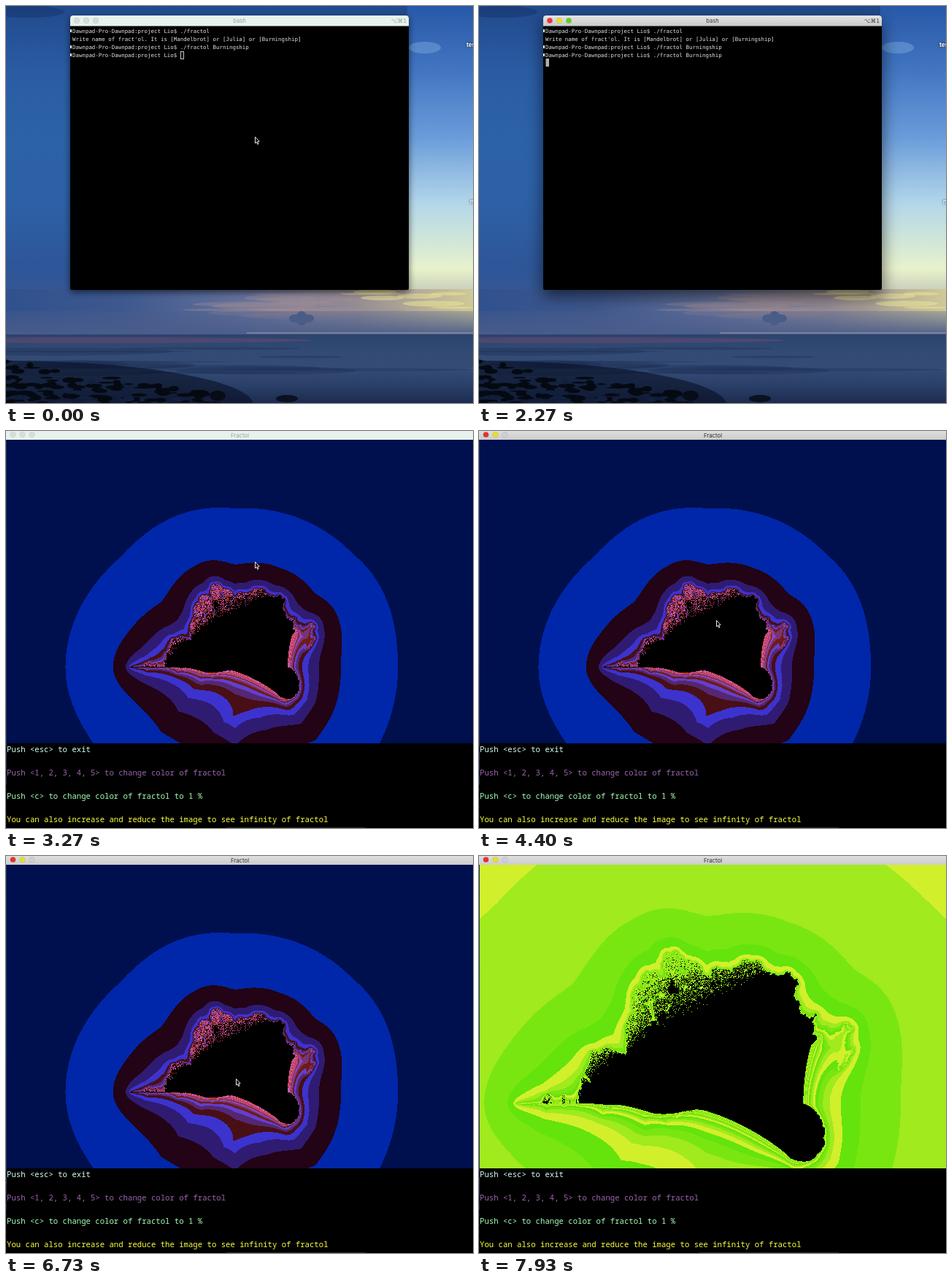
An HTML page with a canvas that plays this animation: 640x544 px, repeating every 8 s.

```html
<!DOCTYPE html>
<html lang="en">
<head>
<meta charset="utf-8">
<title>Fractol</title>
<style>
  html, body { margin: 0; width: 100%; height: 100%; overflow: hidden; background: #000; }
  canvas { display: block; }
</style>
</head>
<body>
<canvas id="stage" width="640" height="544"></canvas>
<script>
const LOOP = 8000;
const ctx = document.getElementById('stage').getContext('2d');
const MONO = '"DejaVu Sans Mono", monospace';
const SANS = 'Inter, sans-serif';

// ---------- helpers ----------
function rect(x, y, w, h, fill) {
  ctx.fillStyle = fill;
  ctx.fillRect(x, y, w, h);
}
function roundRect(x, y, w, h, radii, fill) {
  ctx.fillStyle = fill;
  ctx.beginPath();
  ctx.roundRect(x, y, w, h, radii);
  ctx.fill();
}
function ellipse(x, y, rx, ry, fill) {
  ctx.fillStyle = fill;
  ctx.beginPath();
  ctx.ellipse(x, y, rx, ry, 0, 0, 7);
  ctx.fill();
}
function evenGradient(g, colors) {
  colors.forEach((color, i) => g.addColorStop(i / (colors.length - 1), color));
  return g;
}
const down = (y0, y1, ...colors) => evenGradient(ctx.createLinearGradient(0, y0, 0, y1), colors);
const across = (x0, x1, ...colors) => evenGradient(ctx.createLinearGradient(x0, 0, x1, 0), colors);

function text(str, x, y, color, font, align = 'left') {
  ctx.font = font;
  ctx.fillStyle = color;
  ctx.textAlign = align;
  ctx.fillText(str, x, y);
}
function lights(x, y, colors) {
  colors.forEach((color, i) => {
    ellipse(x + i * 13, y, 4.1, 4.1, 'rgba(0,0,0,.14)');
    ellipse(x + i * 13, y, 3.6, 3.6, color);
  });
}
function offscreen(w, h) {
  const c = document.createElement('canvas');
  c.width = w;
  c.height = h;
  return c;
}
function seeded(seed) {
  return () => (seed = (seed * 16807) % 2147483647) / 2147483647;
}

// ---------- fractal ----------
const VIEW = { w: 640, h: 416, top: 12 };
const MAX_ITER = 40, BAILOUT = 29 * 29, FIRST_BAND = 3;
const ZOOM = { x: 315, y: 304, factor: 1.827, steps: 3 };

// Bands repeat in threes (red, purple, violet) and get warmer each round.
function blueBand(k) {
  const phase = (k + 1) % 3, round = Math.min(4, Math.floor((k - 2) / 3));
  return [
    k < 2 ? 0 : Math.min(200, 10 + 12.5 * k),
    3 + 24 * phase + 12 * round,
    22 + 92 * phase - (round < 0 ? 36 : 0)
  ];
}
// Bands fade from yellow to green in groups of four.
function greenBand(k) {
  const yellow = (1 - (k % 4) / 3) ** 1.5;
  return [100 + 110 * yellow, 228 + 11 * yellow, 12 + 32 * yellow];
}

function burningShip(zoomStep, band) {
  const zoom = ZOOM.factor ** (zoomStep / ZOOM.steps);
  const scale = 95.6 * zoom;
  const x0 = ZOOM.x + (361 - ZOOM.x) * zoom;
  const y0 = ZOOM.y + (323 - ZOOM.y) * zoom - VIEW.top;
  const canvas = offscreen(VIEW.w, VIEW.h);
  const g = canvas.getContext('2d');
  const image = g.createImageData(VIEW.w, VIEW.h);
  const colors = Array.from({ length: MAX_ITER }, (_, n) => band(Math.max(0, n - FIRST_BAND)));
  colors.push([0, 0, 0]);
  for (let py = 0, i = 0; py < VIEW.h; py++) {
    const cy = (py - y0) / scale;
    for (let px = 0; px < VIEW.w; px++, i += 4) {
      const cx = (px - x0) / scale;
      // z starts at c with its sign kept; only later values are folded.
      let x = cx, y = cy, n = 1;
      while (n < MAX_ITER && x * x + y * y <= BAILOUT) {
        const nextX = Math.abs(x * x - y * y + cx);
        y = Math.abs(2 * x * y + cy);
        x = nextX;
        n++;
      }
      image.data.set(colors[n], i);
      image.data[i + 3] = 255;
    }
  }
  g.putImageData(image, 0, 0);
  return canvas;
}

const blueViews = [0, 1, 2, 3].map(step => burningShip(step, blueBand));
const greenView = burningShip(ZOOM.steps, greenBand);

// ---------- desktop ----------
const HORIZON = 450;

// Long soft streaks scattered inside a box: clouds and reflections.
function streaks(seed, count, x, y, w, h, color) {
  const random = seeded(seed);
  for (let i = 0; i < count; i++) {
    ellipse(x + random() * w, y + random() * h, w * (.1 + .25 * random()), 1 + random() * h * .14, color);
  }
}

function drawWallpaper() {
  rect(0, 0, 640, HORIZON, down(0, HORIZON, '#214a8c', '#2a5ca4', '#2c62a8', '#2d60a6', '#2e5698', '#44588c'));
  rect(550, 0, 90, HORIZON, down(0, HORIZON, '#2858a8', '#4276c2', '#6a9cda', '#b2d6ea', '#e8f2cc', '#8a8898'));
  ellipse(574, 57, 22, 8, 'rgba(120,165,222,.5)');
  ellipse(30, 8, 50, 8, 'rgba(18,44,96,.4)');
  // sunset band
  rect(0, 388, 640, 62, across(0, 640, '#30518e', '#3e588e', '#62709a', '#948c94', '#d0c898'));
  streaks(5, 12, 330, 394, 300, 34, 'rgba(164,140,146,.35)');
  streaks(9, 7, 500, 390, 140, 24, 'rgba(240,234,150,.5)');
  rect(0, 418, 640, 32, down(418, 450, 'rgba(74,92,138,.3)', 'rgba(74,92,138,.95)'));
  [-9, 0, 9].forEach(dx => ellipse(405 + dx, 428, 8, 10 - Math.abs(dx) / 2, '#4a5c88'));
  rect(330, 447, 310, 2, 'rgba(168,160,166,.5)');
  // sea
  rect(0, HORIZON, 640, 94, down(HORIZON, 544, '#2a446e', '#324a74', '#344c76', '#2a3f68', '#1c2c50'));
  ellipse(130, 458, 290, 4, 'rgba(100,72,112,.6)');
  streaks(17, 14, 60, 464, 540, 40, 'rgba(24,40,76,.3)');
  // rocky shore, thinning out to the right
  ellipse(0, 548, 340, 62, 'rgba(8,16,36,.6)');
  const random = seeded(11);
  for (let i = 0; i < 130; i++) {
    const x = random() ** 1.6 * 300, top = 486 + x * .16;
    ellipse(x, top + random() * (546 - top), 4 + random() * 9, 1 + random() * 3, random() < .8 ? '#050912' : '#12203e');
  }
  ellipse(290, 534, 11, 7, '#070c18');
  ellipse(385, 538, 15, 5, '#0a1120');
  // labels at the right edge
  ctx.save();
  ctx.shadowColor = '#000';
  ctx.shadowBlur = 3;
  text('test', 631, 56, '#fff', `bold 8px ${SANS}`);
  text('n', 636, 271, '#fff', `bold 8px ${SANS}`);
  ctx.restore();
}

drawWallpaper();
const wallpaper = offscreen(640, 544);
wallpaper.getContext('2d').drawImage(ctx.canvas, 0, 0);

// ---------- terminal ----------
const PROMPT = 'Dawnpad-Pro-Dawnpad:project Lio$ ';
const TERM = { active: 270, recall: 700, enter: 1130 };

function drawTerminal(t) {
  const active = t >= TERM.active, recalled = t >= TERM.recall, running = t >= TERM.enter;
  ctx.save();
  ctx.shadowColor = 'rgba(0,0,0,.6)';
  ctx.shadowBlur = active ? 22 : 10;
  ctx.shadowOffsetY = active ? 8 : 3;
  roundRect(88, 13, 464, 376, [4, 4, 2, 2], '#000');
  ctx.restore();

  roundRect(88, 13, 464, 14.5, [4, 4, 0, 0], active ? down(13, 27, '#e4e4e4', '#cacaca') : '#e6f2ee');
  lights(97, 20, active ? ['#f0323c', '#e8e020', '#5cd020'] : Array(3).fill('#d6dcda'));
  const titleColor = active ? '#383838' : '#98a09e';
  text('bash', 320, 23, titleColor, `7.6px ${SANS}`, 'center');
  text('⌥⌘1', 549, 23, titleColor, '7.6px "DejaVu Sans", sans-serif', 'right');

  const font = `7.45px ${MONO}`;
  const lines = [
    PROMPT + './fractol',
    "Write name of fract'ol. It is [Mandelbrot] or [Julia] or [Burningship]",
    PROMPT + './fractol Burningship',
    PROMPT + (recalled ? './fractol Burningship' : '')
  ];
  lines.forEach((line, i) => {
    const y = 37 + i * 11;
    text(line, 91, y, '#e2e2e2', font);
    if (line.startsWith(PROMPT)) rect(88, y - 5, 2, 4, '#dfe6ee');
  });

  const cursorX = running ? 91.5 : 91 + ctx.measureText(lines[3]).width;
  if (active) {
    rect(cursorX, running ? 72 : 62, 4.5, 11, '#b0b0b0');
  } else {
    ctx.strokeStyle = '#c8c8c8';
    ctx.lineWidth = 1;
    ctx.strokeRect(Math.round(cursorX) + .5, 62.5, 4, 10);
  }
}

// ---------- fractal window ----------
const FRACTAL = { open: 3070, focus: 3430, zoomFrom: 6795, zoomGap: 65, recolor: 7460 };
const HELP = [
  ['Push <esc> to exit', '#d4fff2'],
  ['Push <1, 2, 3, 4, 5> to change color of fractol', '#9c64ac'],
  ['Push <c> to change color of fractol to 1 %', '#a2ffb4'],
  ['You can also increase and reduce the image to see infinity of fractol', '#ffff40']
];

function drawFractalWindow(t) {
  const active = t >= FRACTAL.focus;
  const step = Math.floor((t - FRACTAL.zoomFrom) / FRACTAL.zoomGap) + 1;
  const view = t >= FRACTAL.recolor ? greenView
    : blueViews[Math.max(0, Math.min(ZOOM.steps, step))];
  rect(0, 0, 640, 544, '#000');
  ctx.drawImage(view, 0, VIEW.top);
  ctx.drawImage(wallpaper, 0, 12, 1, 532, 0, 12, 1, 532);
  rect(0, 12, 1, 532, 'rgba(0,0,0,.4)');
  rect(302, 543, 191, 1, '#2a2a2a');
  rect(0, 0, 640, 12, active ? down(0, 12, '#dedede', '#cccccc') : '#e6f2ee');
  lights(9.5, 5, active ? ['#e8302c', '#e8e020', '#cfcfcf'] : Array(3).fill('#dadcda'));
  text('Fractol', 320.5, 8.5, active ? '#333' : '#a0a4a2', `7.8px ${SANS}`, 'center');
  HELP.forEach(([line, color], i) =>
    text(line, 1, 440 + i * 32, color, '500 10.65px "Noto Sans Mono", monospace'));
}

// ---------- pointer ----------
const POINTER_PATH = [[3600, 341, 179], [4350, 325, 259], [5400, 315, 305]];
const ARROW = new Path2D('M.5 .5V9L2.4 7.4 3.7 10.5 5 9.9 3.7 6.9 6.1 6.6Z');

function pointerAt(t) {
  let [, x, y] = POINTER_PATH[0];
  for (let i = 1; i < POINTER_PATH.length; i++) {
    const [t0, x0, y0] = POINTER_PATH[i - 1], [t1, x1, y1] = POINTER_PATH[i];
    if (t < t0) break;
    const u = Math.min(1, (t - t0) / (t1 - t0)), ease = u * u * (3 - 2 * u);
    x = x0 + (x1 - x0) * ease;
    y = y0 + (y1 - y0) * ease;
  }
  return [Math.round(x), Math.round(y)];
}

function drawPointer(t) {
  ctx.save();
  ctx.translate(...pointerAt(t));
  ctx.fillStyle = '#000';
  ctx.fill(ARROW);
  ctx.strokeStyle = '#fff';
  ctx.lineWidth = .9;
  ctx.stroke(ARROW);
  ctx.restore();
}

// ---------- loop ----------
const start = performance.now();

function frame() {
  const t = (performance.now() - start) % LOOP;
  const fractalOpen = t >= FRACTAL.open;
  if (fractalOpen) {
    drawFractalWindow(t);
  } else {
    ctx.drawImage(wallpaper, 0, 0);
    drawTerminal(t);
  }
  // A key press hides the pointer.
  const pointerShown = fractalOpen ? t < FRACTAL.recolor : t < TERM.recall;
  if (pointerShown) drawPointer(t);
  requestAnimationFrame(frame);
}
frame();
</script>
</body>
</html>
```
